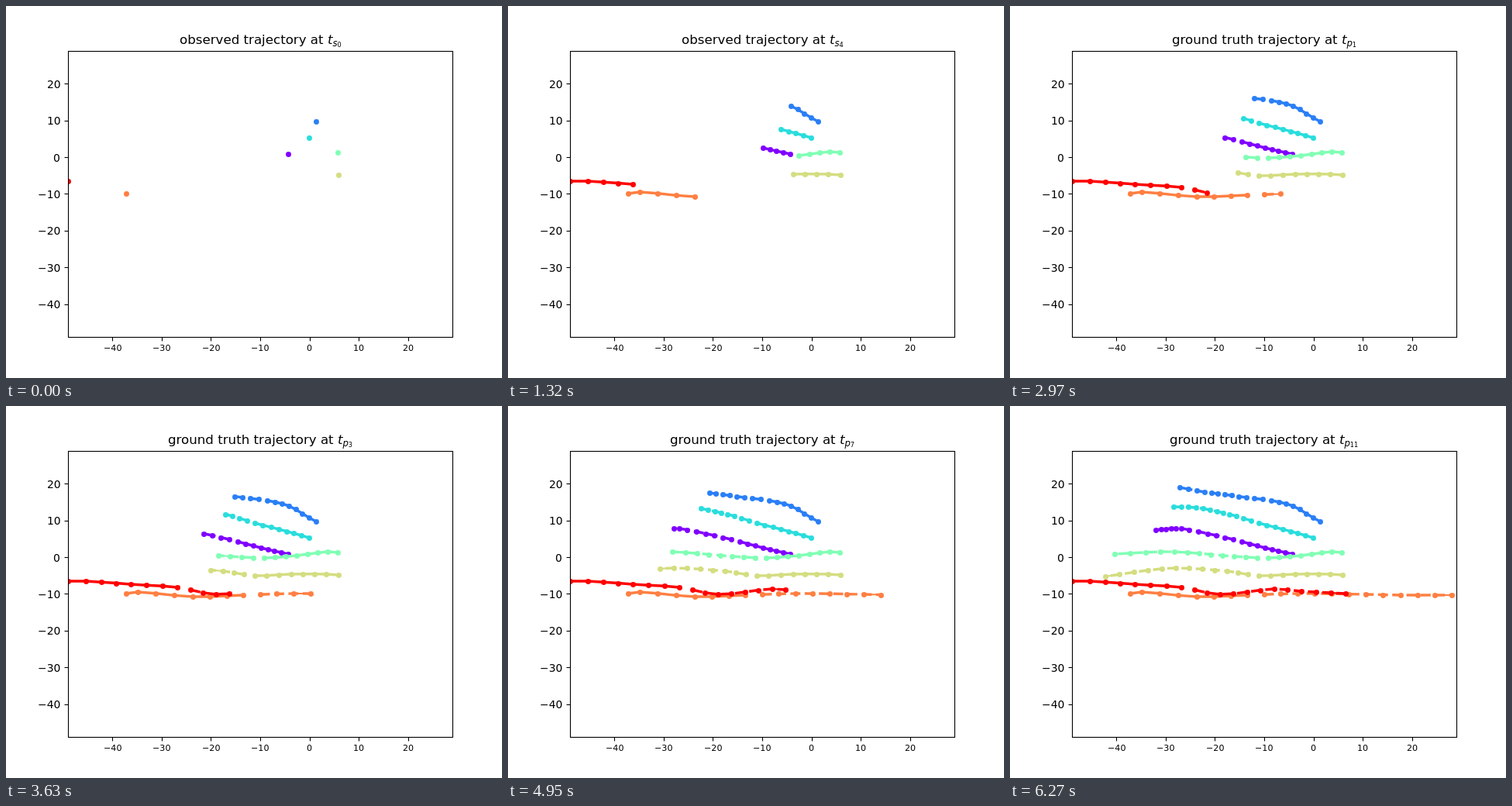
Recreate the animation shown at these times as an HTML page with a canvas. Size 640 by 480 pixels, loop 6600 ms.

```html
<!DOCTYPE html>
<html lang="en">
<head>
<meta charset="utf-8">
<title>Trajectories</title>
<style>
  html, body { margin: 0; width: 100%; height: 100%; overflow: hidden; background: #fff; }
  canvas { display: block; }
</style>
</head>
<body>
<canvas id="stage" width="640" height="480"></canvas>
<script>
const ctx = document.getElementById('stage').getContext('2d');
const PT = 100 / 72;
const STEP_MS = 330, STEPS = 20, OBSERVED = 8;
const BOX = { left: 80, right: 576, top: 57.6, bottom: 427.2 };
const MIN = -49, MAX = 29;
const LINE = 2.5 * PT, THIN = 1.5 * PT, RADIUS = 2.5 * PT;
const DASH = [3.7 * LINE, 1.6 * LINE];
const KNOTS = [0, 1, 4, 7, 10, 14, 16, 19];

const xPixel = v => BOX.left + (v - MIN) / (MAX - MIN) * (BOX.right - BOX.left);
const yPixel = v => BOX.bottom - (v - MIN) / (MAX - MIN) * (BOX.bottom - BOX.top);
const snap = v => Math.floor(v + 0.5) + 0.5;
const font = (pt, style = '') => `${style} ${pt * PT}px "DejaVu Sans", sans-serif`;

// Cubic Hermite curve through the key steps.
function spline(values, t) {
  const last = KNOTS.length - 1;
  const slope = i => {
    const a = Math.max(i - 1, 0), b = Math.min(i + 1, last);
    return (values[b] - values[a]) / (KNOTS[b] - KNOTS[a]);
  };
  let i = 0;
  while (i < last - 1 && t >= KNOTS[i + 1]) i++;
  const h = KNOTS[i + 1] - KNOTS[i], u = (t - KNOTS[i]) / h, w = 1 - u;
  return values[i] * w * w * (1 + 2 * u) + values[i + 1] * u * u * (3 - 2 * u)
    + h * u * w * (w * slope(i) - u * slope(i + 1));
}

function makeTrack(color, xs, ys) {
  const points = Array.from({ length: STEPS }, (_, t) => ({ x: spline(xs, t), y: spline(ys, t) }));
  return { color, points };
}

// Each walker's place at the key steps.
const tracks = [
  makeTrack('#8000ff', [364, 355, 329, 299, 266, 221, 208, 188], [191, 189, 183, 175, 167, 158, 158, 160]),
  makeTrack('#2a7ff6', [400, 391, 365, 337, 305, 268, 251, 219], [149, 144, 129, 122, 118, 113, 111, 105]),
  makeTrack('#2adddd', [391, 381, 352, 321, 292, 258, 240, 211], [170, 167, 159, 151, 142, 134, 131, 130]),
  makeTrack('#80ffb4', [428, 415, 375, 333, 289, 229, 194, 135], [189, 188, 193, 196, 194, 189, 188, 191]),
  makeTrack('#d4dd80', [429, 413, 368, 321, 280, 214, 178, 123], [218, 217, 217, 219, 213, 209, 212, 220]),
  makeTrack('#ff7f42', [155, 170, 241, 306, 371, 459, 504, 570], [242, 240, 246, 244, 242, 243, 244, 244]),
  makeTrack('#ff0000', [80, 103, 161, 221, 271, 341, 376, 433], [226, 226, 230, 234, 243, 236, 239, 242])
];

function polyline(points, width, dash = []) {
  ctx.lineWidth = width;
  ctx.setLineDash(dash);
  ctx.beginPath();
  for (const p of points) ctx.lineTo(p.x, p.y);
  ctx.stroke();
  ctx.setLineDash([]);
}

function drawTrack({ color, points }, step) {
  const shown = points.slice(0, step + 1);
  const future = shown.slice(OBSERVED);
  ctx.strokeStyle = ctx.fillStyle = color;
  ctx.lineJoin = 'round';
  polyline(shown.slice(0, OBSERVED), LINE);
  polyline(future, LINE, DASH);
  polyline(future.slice(-2), THIN);
  for (const p of shown) {
    ctx.beginPath();
    ctx.arc(snap(p.x), snap(p.y), RADIUS, 0, 2 * Math.PI);
    ctx.fill();
  }
}

function segment(x1, y1, x2, y2) {
  ctx.beginPath();
  ctx.moveTo(x1, y1);
  ctx.lineTo(x2, y2);
  ctx.stroke();
}

// Writes text on whole pixels; align is the share of its width left of x.
function label(text, pt, x, y, align) {
  ctx.font = font(pt);
  ctx.fillText(text, Math.round(x - align * ctx.measureText(text).width), Math.round(y));
}

function drawAxes() {
  const left = snap(BOX.left), right = snap(BOX.right);
  const top = snap(BOX.top), bottom = snap(BOX.bottom);
  ctx.strokeStyle = ctx.fillStyle = '#000';
  ctx.lineWidth = 0.8 * PT;
  ctx.lineJoin = 'miter';
  ctx.strokeRect(left, top, right - left, bottom - top);
  for (let v = -40; v <= 20; v += 10) {
    const text = String(v).replace('-', '\u2212');
    const x = xPixel(v), y = yPixel(v);
    segment(snap(x), bottom, snap(x), bottom + 5);
    segment(left, snap(y), left - 5, snap(y));
    label(text, 8, x, 445, 0.5);
    label(text, 10, 70.3, y + 5.55, 1);
  }
}

function drawTitle(step) {
  const seen = step < OBSERVED;
  const parts = [
    [seen ? 'observed trajectory at ' : 'ground truth trajectory at ', font(12), 0],
    ['t', font(12, 'oblique'), 0],
    [seen ? 's' : 'p', font(8.4, 'oblique'), 2.6],
    [String(seen ? step : step - OBSERVED), font(5.88), 4.4]
  ];
  const widths = parts.map(([text, face]) => {
    ctx.font = face;
    return ctx.measureText(text).width;
  });
  let x = Math.round((BOX.left + BOX.right - widths.reduce((a, b) => a + b)) / 2);
  parts.forEach(([text, face, drop], i) => {
    ctx.font = face;
    ctx.fillText(text, x, 49 + drop);
    x += widths[i];
  });
}

function draw() {
  const step = Math.floor(performance.now() / STEP_MS) % STEPS;
  ctx.fillStyle = '#fff';
  ctx.fillRect(0, 0, 640, 480);
  ctx.save();
  ctx.beginPath();
  ctx.rect(BOX.left, BOX.top, BOX.right - BOX.left, BOX.bottom - BOX.top);
  ctx.clip();
  for (const track of tracks) drawTrack(track, step);
  ctx.restore();
  drawAxes();
  drawTitle(step);
  requestAnimationFrame(draw);
}
draw();
</script>
</body>
</html>
```
